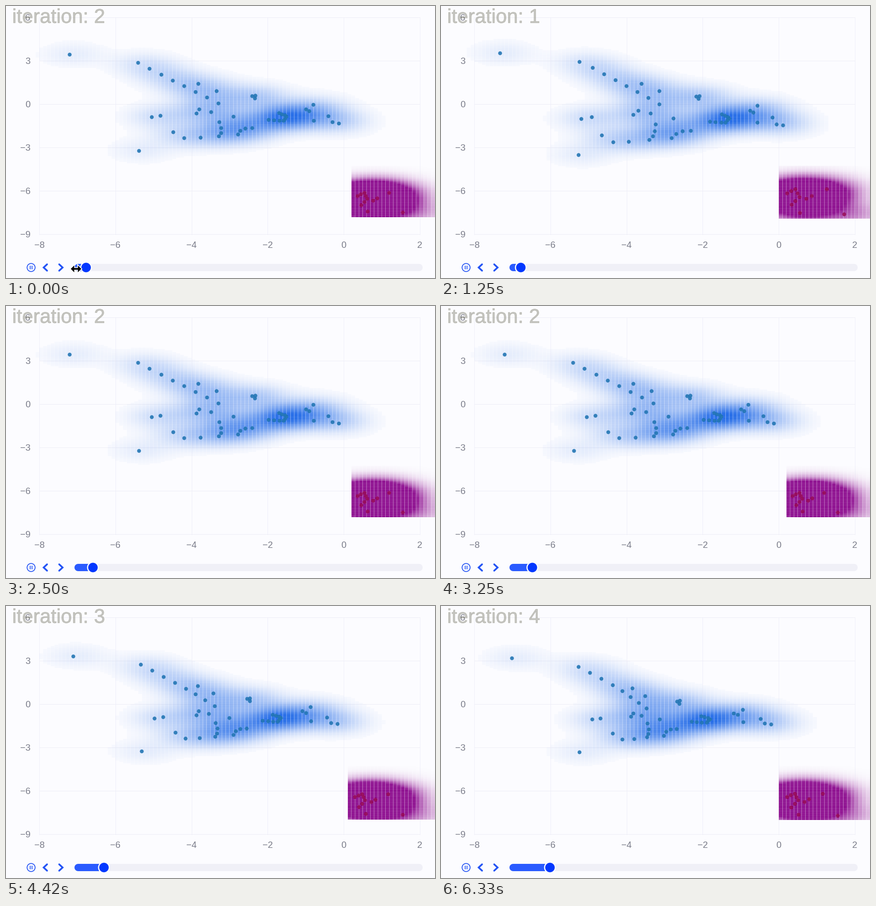
Write a matplotlib script that moves like this. It is 940 px wide and 596 px high and loops after 6.41 s.

```python
import numpy as np
import matplotlib.pyplot as plt
import matplotlib.patheffects as pe
from matplotlib.animation import FuncAnimation
from matplotlib.patches import Circle, Polygon

W, H = 940, 596
FRAMES, LOOP = 77, 6410
FPS = 12
UX, UY = 83.4, 31.73          # pixels per data unit
CX, CY = UX / 10, UY / 10     # heat cell size
LEFT, RIGHT, TOP, BOTTOM = 73, 907, 24.5, 500.5
ZERO_X = LEFT + 8 * UX
BG = "#fcfcff"
BLUE = (24 / 255, 100 / 255, 230 / 255)
PURPLE = (136 / 255, 2 / 255, 138 / 255)
PX = 0.72                     # points per pixel at 100 dpi


def strand(count, *keys):
    """Dots spread evenly along a path through a few key points."""
    keys = np.array(keys, float)
    u = np.linspace(0, len(keys) - 1, count)
    steps = np.arange(len(keys))
    return np.column_stack([np.interp(u, steps, axis) for axis in keys.T])


BLUE_DOTS = np.vstack([
    strand(1, (139, 106)),                                     # lone outliers
    strand(1, (291, 316.5)),
    strand(1, (498, 242)),
    strand(8, (288.5, 124), (378, 169), (464.5, 213)),         # upper arm
    strand(2, (420.5, 170), (460.5, 185.5)),
    strand(3, (539, 197), (546, 196), (545, 202)),
    strand(2, (319, 243), (338, 239.5)),                       # middle arm
    strand(3, (417, 235), (423, 226), (448.5, 232)),
    strand(4, (467, 254), (473, 274), (465.5, 284.5)),
    strand(3, (366, 276), (389.5, 289), (426, 288)),           # lower arm
    strand(4, (508, 281), (516, 269), (538.5, 266.5)),
    strand(9, (575, 249), (607, 252), (615, 241), (598, 234)),  # core
    strand(3, (656.5, 226), (664, 230), (673, 216)),           # right end
    strand(4, (674, 250.5), (706, 241), (715, 254), (729, 256.5))])

RED_DOTS = np.vstack([
    strand(7, (769.5, 415.5), (784.5, 409), (791, 422), (778, 436)),
    strand(3, (803.5, 425.5), (812.5, 420.5), (839, 409)),
    strand(1, (792, 450)),
    strand(1, (869, 452))])


def blue_at(n):
    """Arms drift inwards; the step from 1 to 2 is a wider shear."""
    x, y = BLUE_DOTS.T
    s = n - 2
    if s < 0:
        lean = x - 3 * (y - 150)
        dx = np.interp(lean, [-200, 0, 110, 200, 400], [10, -16, -4, 10, 20])
        dx = np.minimum(dx, (x - 200) / 6)
        dy = np.interp(y, [106, 200, 250, 290], [-3, 1, 4, 9])
    else:
        dx = s * np.interp(x, [139, 380, 470, 600, 700], [8, 5, -8, -14, -3])
        dy = s * np.interp(y, [106, 210, 260, 320], [4, 6, 1, 2])
    return np.column_stack([x + dx, y + dy])


def red_at(n):
    """The cluster slides left and spreads away from the second step."""
    s = n - 2
    spread = 1.26 if s < 0 else 1 + 0.06 * s
    centre = np.array([800, 425])
    shift = np.array([-4 * abs(s), 3.5 * np.clip(s, -1, 1)])
    return centre + (RED_DOTS - centre) * spread + shift


def coverage(size, start, pitch, gap):
    """Share of each pixel covered by a row of cells with small gaps."""
    sub = (np.arange(size * 20) + 0.5) / 20
    inside = (sub - start) % pitch < pitch - gap
    return inside.reshape(size, 20).mean(axis=1)


def density(points, sigma):
    """Gaussian sum sampled once per heat cell."""
    xs = LEFT + (np.floor((np.arange(W) + 0.5 - LEFT) / CX) + 0.5) * CX
    ys = TOP + (np.floor((np.arange(H) + 0.5 - TOP) / CY) + 0.5) * CY
    gx = np.exp(-((xs - points[:, :1] - 8) / (UX * sigma)) ** 2 / 2)
    gy = np.exp(-((ys - points[:, 1:]) / (UY * sigma)) ** 2 / 2)
    return gy.T @ gx


CELLS = np.outer(coverage(H, TOP, CY, 0.28), coverage(W, LEFT, CX, 0.45))


def heat_image(blue, red):
    value = density(blue, 0.56)
    value /= 0.94 * value.max()
    value[value < 0.025] = 0
    img = np.zeros((H, W, 4))
    img[..., :3] = BLUE
    img[..., 3] = np.clip(value, 0, 1) * CELLS

    # The red field starts on a cell edge just outside its dots.
    edge = np.floor((red[:, 0].min() - 12 - ZERO_X) / CX) * CX + ZERO_X
    bottom = int(red[:, 1].max() + 11)
    box = np.s_[350:bottom, int(round(edge)):]
    img[box][..., :3] = PURPLE
    img[box][..., 3] = (np.clip(density(red, 0.62) * 0.5, 0, 1) * CELLS)[box]
    return img


states = {}
for n in range(1, 5):
    blue, red = blue_at(n), red_at(n)
    states[n] = blue, red, heat_image(blue, red)

plt.rcParams["font.family"] = "Liberation Sans"
fig = plt.figure(figsize=(W / 100, H / 100), dpi=100, facecolor=BG)
ax = fig.add_axes([0, 0, 1, 1])
ax.axis("off")


def line(xs, ys, color, width, z, **kw):
    return ax.plot(xs, ys, color=color, lw=width * PX, zorder=z, **kw)[0]


def label(x, y, value, ha):
    text = str(value).replace("-", "\u2212")
    ax.text(x, y, text, size=20 * PX, color="#7b7d8a", ha=ha,
            va="baseline", zorder=2)


# Axes grid and labels
for v in range(-8, 3, 2):
    x = LEFT + (v + 8) * UX
    line([x, x], [TOP, BOTTOM], "#eeeef9", 1, 1)
    label(x, 530, v, "center")
for v in range(-9, 7, 3):
    y = TOP + (6 - v) * UY
    line([LEFT, RIGHT], [y, y], "#ededf6", 1, 1)
    label(53.5, y + 7, v, "right")

heat = ax.imshow(states[2][2], extent=(0, W, H, 0), interpolation="nearest",
                 aspect="auto", zorder=3)
dot = dict(ls="", marker="o", ms=8.4 * PX, mew=0)
blue_dots = ax.plot([], [], color="#2376b4", alpha=0.9, zorder=4, **dot)[0]
red_dots = ax.plot([], [], color="#980c56", alpha=0.85, zorder=4, **dot)[0]

tint = "#8f8f82"
title = ax.text(13.5, 37, "", size=43.6 * PX, color=tint, alpha=0.5,
                va="baseline", zorder=5)
title.set_path_effects([pe.Stroke(linewidth=0.8 * PX, foreground=tint)])

# Player controls
ICON = "#2454f5"
ax.add_patch(Circle((55, 573), 8.8, fill=False, ec=ICON, lw=1.8 * PX, zorder=6))
for x in (53, 57):
    line([x, x], [569.3, 576.7], ICON, 1.8, 6, solid_capstyle="butt")
for back, tip in ((90, 82.5), (116.5, 124)):
    line([back, tip, back], [566, 573, 580], ICON, 3.8, 6,
         solid_capstyle="round", solid_joinstyle="miter")

# Slider
line([158, 905], [573, 573], "#f0f0f7", 16, 6, solid_capstyle="round")
fill = line([158, 158], [573, 573], "#2a5bff", 16, 7, solid_capstyle="round")
ring = ax.add_patch(Circle((0, 573), 13, fc=BG, lw=0, zorder=8))
knob = ax.add_patch(Circle((0, 573), 10.4, fc="#0338ff", lw=0, zorder=9))

half = np.array([(-11.5, 0), (-4, -7.5), (-4, -1.8), (4, -1.8), (4, -7.5),
                 (11.5, 0)])
arrow = np.vstack([half, half[-2:0:-1] * (1, -1)])
halo = ax.add_patch(Polygon(arrow, fc="white", ec="white", lw=3.4 * PX,
                            zorder=10))
cursor = ax.add_patch(Polygon(arrow, fc="black", lw=0, zorder=11))

ax.set_xlim(0, W)
ax.set_ylim(H, 0)

START, STEP = 150.2, 25.3
GLIDE_T = [0, 410, 1080, 1580]
GLIDE_X = [0, 9, 18.5, 24.7]


def player(i):
    """Iteration shown and knob position."""
    if i < 6:
        return 2, START + STEP
    n, phase = divmod(i - 20, 24)
    glide = np.interp(phase * 1000 / FPS, GLIDE_T, GLIDE_X)
    return n + 2, START + STEP * (n + 1) + glide


def pointer(i):
    """Cursor position while it drags the knob, then nothing."""
    for end, pos in ((2, (153.5, 576)), (4, (150.5, 577)),
                     (6, (155.5, 576)), (9, (157, 575))):
        if i < end:
            return pos
    return None


def update(i):
    n, x = player(i)
    blue, red, image = states[n]
    heat.set_data(image)
    blue_dots.set_data(blue.T)
    red_dots.set_data(red.T)
    title.set_text(f"iteration: {n}")
    fill.set_xdata([158, max(158, x - 4)])
    ring.center = knob.center = (x, 573)
    pos = pointer(i)
    for part in (halo, cursor):
        part.set_visible(pos is not None)
        if pos:
            part.set_xy(arrow + pos)
    return heat, blue_dots, red_dots, title, fill, ring, knob, halo, cursor


anim = FuncAnimation(fig, update, frames=FRAMES, interval=LOOP / FRAMES,
                     repeat=True, repeat_delay=0)
plt.show()
```
